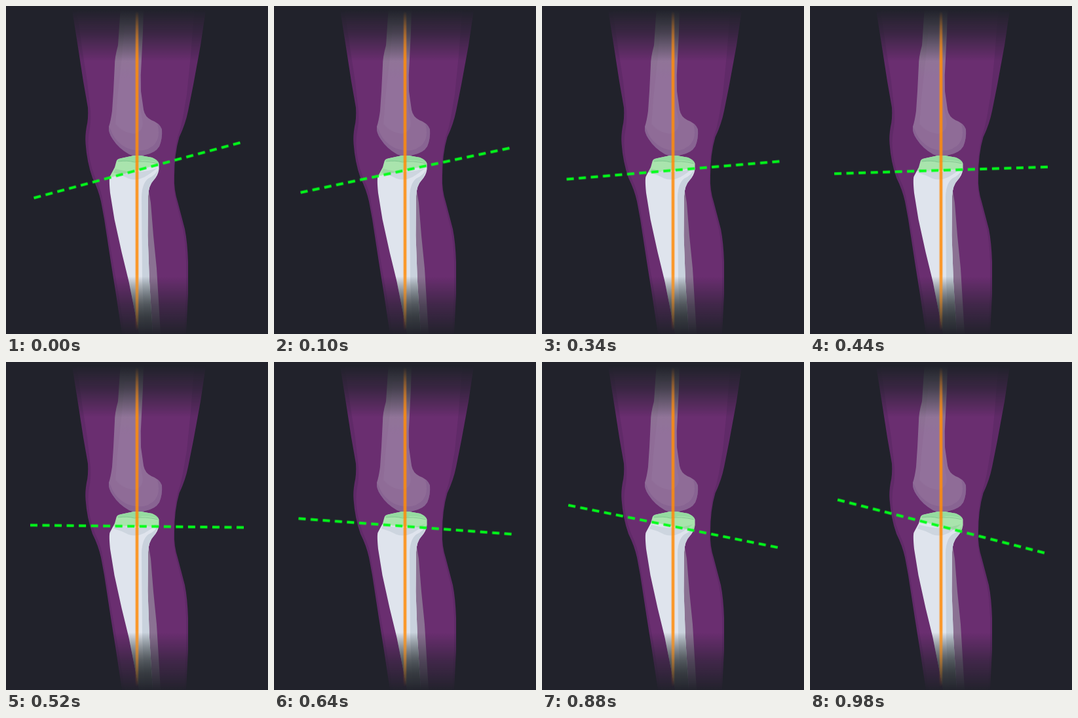
Animation of 400x500 px, one loop 1000 ms. Source, as an HTML page:

```html
<!DOCTYPE html>
<html lang="en">
<head>
<meta charset="utf-8">
<title>Knee alignment</title>
<style>
  html, body { margin: 0; width: 100%; height: 100%; overflow: hidden; background: #21222b; }
  svg { display: block; width: 100vw; height: 100vh; }
  .spin { transform-origin: 200px 250.5px; transform: rotate(-15deg); }
  .cut { mix-blend-mode: multiply; }
</style>
</head>
<body>
<svg viewBox="0 0 400 500">
  <defs>
    <linearGradient id="fade" gradientUnits="userSpaceOnUse" x1="0" y1="0" x2="0" y2="500">
      <stop offset=".01" stop-color="#fff" stop-opacity="0"/>
      <stop offset=".08" stop-color="#fff" stop-opacity=".35"/>
      <stop offset=".168" stop-color="#fff"/>
      <stop offset=".825" stop-color="#fff"/>
      <stop offset=".91" stop-color="#fff" stop-opacity=".45"/>
      <stop offset="1" stop-color="#fff" stop-opacity=".03"/>
    </linearGradient>
    <linearGradient id="shaft" gradientUnits="userSpaceOnUse" x1="0" y1="412" x2="0" y2="475">
      <stop offset="0" stop-color="#5c6a64" stop-opacity="0"/>
      <stop offset="1" stop-color="#5c6a64" stop-opacity=".8"/>
    </linearGradient>
    <linearGradient id="top" gradientUnits="userSpaceOnUse" x1="0" y1="10" x2="0" y2="110">
      <stop offset="0" stop-color="#85808a"/>
      <stop offset="1" stop-color="#8f6c97"/>
    </linearGradient>
    <linearGradient id="axis" gradientUnits="userSpaceOnUse" x1="0" y1="8" x2="0" y2="495">
      <stop offset="0" stop-color="#ff8c0a" stop-opacity="0"/>
      <stop offset=".15" stop-color="#ff8c0a"/>
      <stop offset=".82" stop-color="#ff8c0a"/>
      <stop offset="1" stop-color="#ff8c0a" stop-opacity="0"/>
    </linearGradient>
    <mask id="ends" maskUnits="userSpaceOnUse" x="0" y="0" width="400" height="500">
      <rect width="400" height="500" fill="url(#fade)"/>
    </mask>
    <path id="tibia" d="M168.500 237Q169 233 176 232L195 228H206L223 231Q231 235 233.500 240V249Q232 259 225 266Q218 273 217 290L216.500 350L219 420L224 500H203.500L192.500 445L187.500 420L176.500 375L165.500 325L159 285Q157 265 158.500 260L166 246Z"/>
    <clipPath id="bone"><use href="#tibia"/></clipPath>
  </defs>

  <rect width="400" height="500" fill="#21222b"/>

  <g mask="url(#ends)">
    <!-- soft tissue -->
    <path fill="#602a68" d="M100 0L109.500 60L118 115L125 155Q126 172 123 184Q120.500 198 121.500 210Q123.500 238 132 262Q141 280 145 298L150 325L160 390L168 440L177 500H275L278 440V390Q277 360 273 340L262.500 300Q256 280 257 260Q257 225 264.500 200Q274 180 278 160L286 120L297 60L306 0Z"/>
    <path fill="#6a2e70" d="M107 0L115.500 60L124 115L129 160Q130 178 127 192Q124 207 127 228Q130 248 138 266Q146 282 148 300L154 335L164 395L172 440L181 500H272L275 440V390Q274 360 270 340L260 300Q255 280 256 260Q256 225 262 200Q267 186 270 170L276 135L282 75L288 0Z"/>

    <!-- fibula -->
    <path fill="#8a7192" d="M218 282L221 300L225 350L230 400L233 450L236 500H216L215 290Z"/>

    <!-- femur -->
    <path fill="url(#top)" d="M175 0L171 60Q166 78 166 90L164 130L162 160Q160 175 157 184Q156 193 163 203Q172 217 188 226Q200 231 212 227Q228 224 234 214Q239 202 238 188Q234 178 222 174Q212 169 210 158L206 130Q205 105 207 80L209 40L210 0Z"/>
    <path fill="#856091" opacity=".65" d="M157 184Q156 193 163 203Q172 217 188 226Q200 231 212 227Q228 224 234 214Q239 202 238 188Q236 182 231 179Q235 194 231 204Q226 216 210 220Q191 222 177 212Q164 202 160 189Z"/>
    <path fill="#9a7aa1" opacity=".3" d="M181 30L176 85L170 140L167 180Q178 193 195 195Q209 192 209 178L204 150L200 110L202 60L203 30Z"/>

    <!-- tibia -->
    <use href="#tibia" fill="#dfe4ed"/>
    <g clip-path="url(#bone)">
      <path fill="#c9d2dd" d="M234 246Q229 258 217 263Q208 270 207 290L208 420L212 500H230L217 290Z"/>
      <path fill="#cdd5df" d="M167 248Q184 253 200 253Q218 252 231 247Q220 256 211 261Q199 267 187 263Q176 257 164 254Z"/>
      <path fill="url(#shaft)" d="M180 400H240V500H180Z"/>
    </g>
    <g class="cut" clip-path="url(#bone)">
      <rect class="spin" x="0" y="50" width="400" height="200.500" fill="#c2ffba"/>
    </g>
    <path fill="#95dba0" d="M169 237Q170 233 177 232L195 228H206L223 231Q231 234 233 239Q221 235 208 235Q200 238 190 237Q179 235 169 237Z"/>
    <path fill="none" stroke="#82c690" d="M171 237Q186 235 196 238Q211 235 232 240"/>
  </g>

  <path fill="none" stroke="#00ff19" stroke-width="4" stroke-dasharray="11 7.53" class="spin" d="M37 250.500H363"/>

  <g fill="url(#axis)">
    <rect x="197" y="8" width="6" height="487" opacity=".4"/>
    <rect x="198.500" y="8" width="3" height="487" opacity=".9"/>
  </g>
</svg>
<script>
  const sweep = [{ transform: "rotate(-15deg)" }, { transform: "rotate(15deg)" }];
  const timing = { duration: 1000, iterations: Infinity, easing: "steps(50, end)" };
  for (const el of document.querySelectorAll(".spin")) el.animate(sweep, timing);
</script>
</body>
</html>
```
